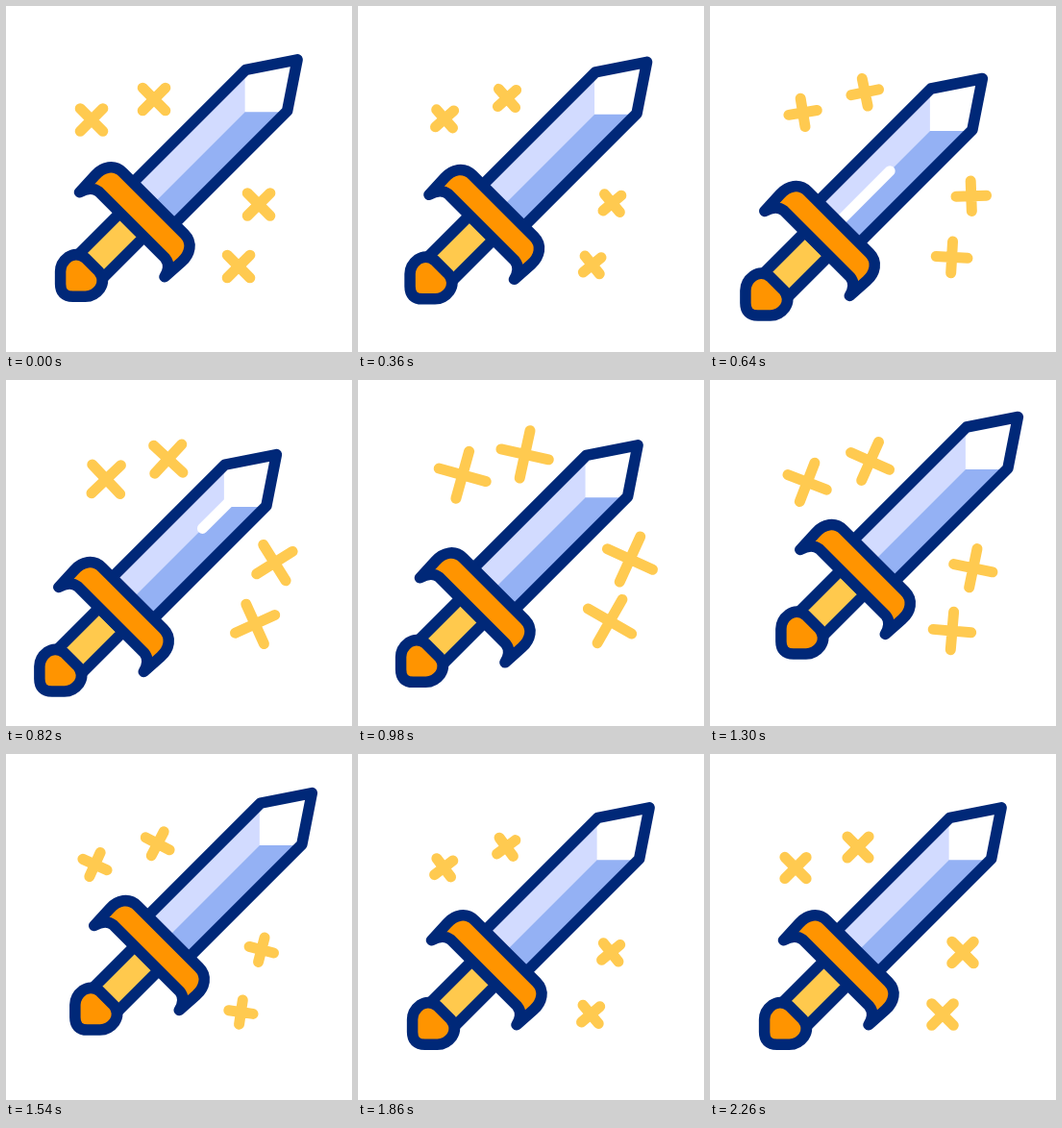
Recreate the animation shown at these times as an HTML page. Size 360 by 360 pixels, loop 2820 ms.

```html
<!DOCTYPE html>
<html lang="en">
<head>
<meta charset="utf-8">
<title>Sword</title>
<style>
  html, body { margin: 0; height: 100%; overflow: hidden; background: #fff; }
  svg { display: block; width: 100vw; height: 100vh; }
  .line { fill: none; stroke: #002878; stroke-width: 11.5; stroke-linecap: round; stroke-linejoin: round; }
  .line.orange { fill: #ff9400; }
  .line.yellow { fill: #ffc94d; }
  #sparks path { fill: none; stroke: #ffca50; stroke-width: 11; stroke-linecap: round; }
  #glint { stroke: #fff; stroke-width: 11; stroke-linecap: round; }
</style>
</head>
<body>
<svg viewBox="0 0 360 360">
  <defs>
    <clipPath id="blade"><path d="M135 182 250 67 303.5 56.5 293 110 178 225Z"/></clipPath>
  </defs>
  <g id="sparks"></g>
  <g id="sword">
    <g clip-path="url(#blade)">
      <path fill="#fff" d="M249 67 303.5 56.5 293 111 249 111Z"/>
      <path fill="#d2dbff" d="M135 182 249 68V111L157 203Z"/>
      <path fill="#94b1f4" d="M249 111H293L178 226 157 203Z"/>
      <line id="glint"/>
    </g>
    <path class="line" d="M135 182 250 67 303.5 56.5 293 110 178 225"/>
    <path class="line yellow" d="M119 216 75 260 100 285 144 241Z"/>
    <path class="line orange" d="M57 277Q57 268 65 262 74 256 83 263L97 277Q104 286 98 295 92 303 83 303H70Q57 303 57 290Z"/>
    <path class="line orange" d="M77 194.5 93 177C101 168 113 165 122 174L186 238C195 247 192 259 183 267L165.5 282.5C170 275 170 268 166 263L97 194C92 190 85 190 77 194.5Z"/>
  </g>
</svg>
<script>
const LOOP = 2820;
const $ = id => document.getElementById(id);
const clamp = u => Math.min(1, Math.max(0, u));
const part = (t, from, to) => clamp((t - from) / (to - from));
const easeInOut = u => (1 - Math.cos(Math.PI * u)) / 2;
const easeOut = u => 1 - (1 - u) ** 1.25;
const bell = (t, mid, width) => Math.exp(-(((t - mid) / width) ** 2));

// Pull back, thrust forward, return to rest.
const thrust = t =>
  -22.6 * easeInOut(part(t, 250, 760))
  + 44.3 * easeInOut(part(t, 760, 1440))
  - 21.7 * easeOut(part(t, 1440, 1850));

// Sparks fly out, make half a turn and come back the same way.
const drift = t => 20 * bell(t, 975, 390);
const spin = t => -45 + 180 * bell(t, 1100, 400);

// Arms shrink, stretch at mid-flight, shrink again and settle.
const reach = t => {
  const stretch = 9.5 * (1 - ((t - 1020) / 370) ** 2) * bell(t, 1020, 560);
  return 16.7 + stretch * part(t, 0, 400);
};

const sparks = [
  { x: 242, y: 271, lag: 0 },
  { x: 263, y: 206.5, lag: 20 },
  { x: 89, y: 118.5, lag: 50 },
  { x: 154, y: 97, lag: 60 }
];
for (const s of sparks) {
  s.el = document.createElementNS('http://www.w3.org/2000/svg', 'path');
  $('sparks').append(s.el);
}

function drawGlint(t) {
  const head = 110 * part(t, 490, 780), tail = 110 * part(t, 640, 900);
  const el = $('glint');
  el.style.display = head > tail ? '' : 'none';
  el.setAttribute('x1', 150 + tail);
  el.setAttribute('y1', 210 - tail);
  el.setAttribute('x2', 150 + head);
  el.setAttribute('y2', 210 - head);
}

function draw(now) {
  const t = now % LOOP;
  const p = thrust(t);
  $('sword').setAttribute('transform', `translate(${p - 0.4} ${-p - 0.7})`);
  drawGlint(t);
  for (const { x, y, lag, el } of sparks) {
    const k = t - lag, d = drift(k), r = reach(k);
    el.setAttribute('d', `M${-r} 0H${r}M0 ${-r}V${r}`);
    el.setAttribute('transform', `translate(${x + d} ${y - d}) rotate(${spin(k)})`);
  }
  requestAnimationFrame(() => draw(performance.now()));
}
draw(0);
</script>
</body>
</html>
```
